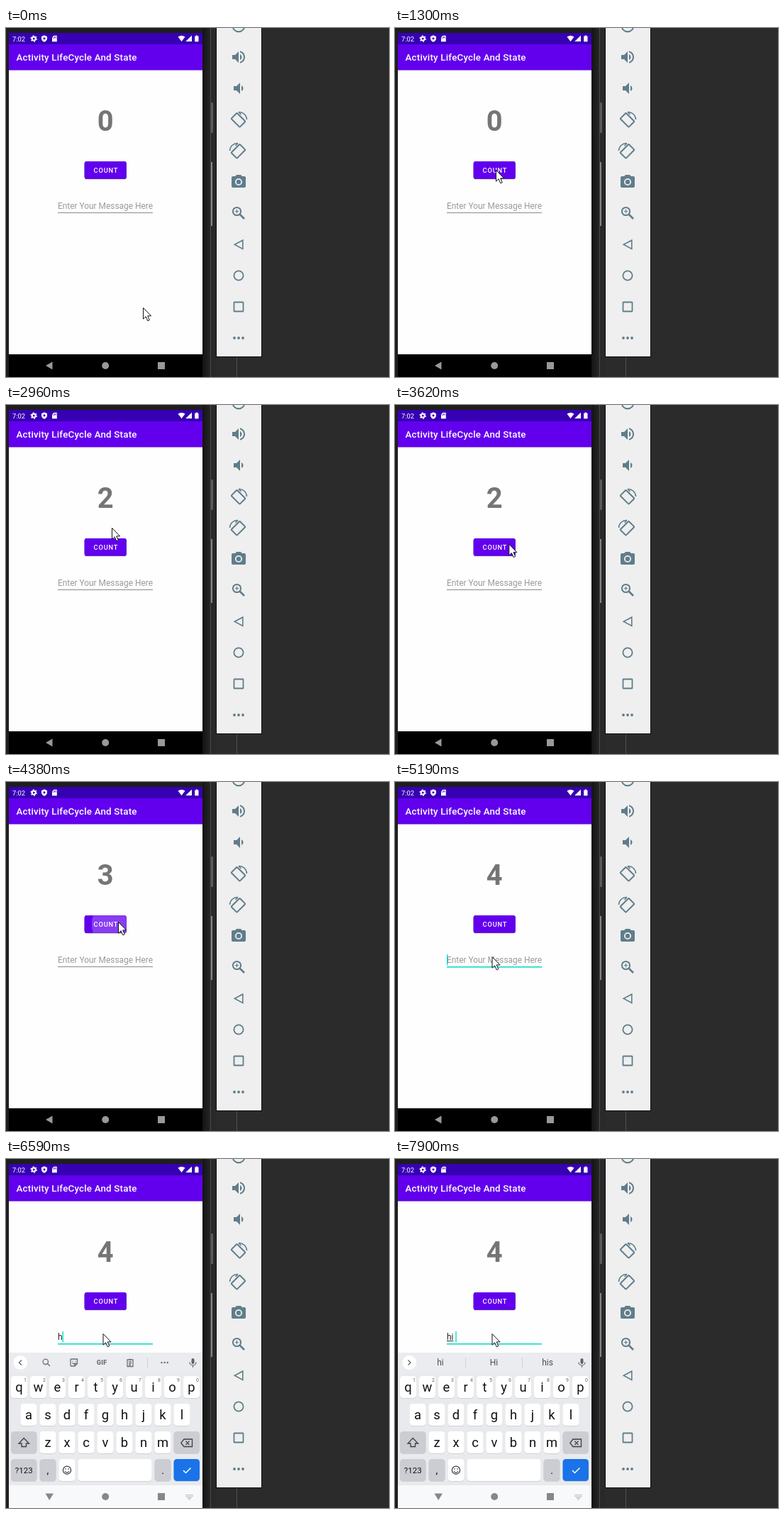
These frames come from a looping animation (540 by 492 pixels, 8000 ms). An HTML page:

```html
<!DOCTYPE html>
<html lang="en">
<head>
<meta charset="utf-8">
<title>Activity state demo</title>
<style>
  html, body { margin: 0; width: 100%; height: 100%; overflow: hidden; background: #2b2b2b; }
  svg { display: block; width: 100vw; height: 100vh; }
  text { font-family: Roboto, "Noto Sans", sans-serif; white-space: pre; }
  .mid { text-anchor: middle; }
  .medium { font-weight: 500; }
</style>
</head>
<body>
<svg viewBox="0 0 540 492">
  <defs>
    <clipPath id="screen"><rect x="4" y="7" width="273" height="485"/></clipPath>
    <clipPath id="buttonShape"><use href="#buttonRect"/></clipPath>
    <linearGradient id="bezel"><stop offset="0" stop-color="#141414"/><stop offset="1" stop-color="#242424"/></linearGradient>
  </defs>

  <!-- desktop and phone frame -->
  <rect width="540" height="492" fill="#2b2b2b"/>
  <rect width="288" height="492" fill="#1e1e1e"/>
  <rect x="277" width="10" height="492" fill="url(#bezel)"/>
  <rect x="287" width="9" height="492" fill="#292929"/>
  <path d="M288.5 0V492" stroke="#484848"/>
  <rect x="289" y="105" width="3" height="43" rx="1" fill="#5a5a5a"/>
  <rect x="289" y="189" width="2" height="90" fill="#858585"/>
  <path d="M325.5 463V492" stroke="#505050"/>

  <!-- emulator tools -->
  <rect x="296.5" y="-2" width="64" height="465.5" fill="#efefef" stroke="#0c0c0c"/>
  <g fill="none" stroke="#607d8b" stroke-width="2">
    <circle cx="328" cy="-3" r="8.3"/>
    <g id="rotateTool" transform="translate(328 129)">
      <rect x="-8.5" y="-5.7" width="17" height="11.4" rx="1" transform="translate(-.5 .8) rotate(45)"/>
      <path d="M0 -10.5C6 -11 11.300 -6 11.500 0M0 -10.500L3.500 -7" stroke-width="1.500"/>
    </g>
    <use href="#rotateTool" transform="translate(655 44) scale(-1 1)"/>
    <circle cx="325.5" cy="258.5" r="5.6"/>
    <path d="M329.5 262.5L336 269" stroke-width="2.6"/>
    <path d="M322.7 258.5h5.6M325.5 255.7v5.6" stroke-width="1.2"/>
    <path d="M333.8 299.200V311.500L322.300 305.300Z" stroke-width="1.600"/>
    <circle cx="328" cy="349" r="6.6" stroke-width="1.8"/>
    <rect x="321.500" y="386.500" width="13" height="13" rx=".600" stroke-width="1.800"/>
  </g>
  <g fill="#607d8b">
    <g transform="translate(316 29)">
      <path d="M3 9v6h4l5 5V4L7 9H3z"/>
      <path d="M16.5 12c0-1.77-1.02-3.29-2.5-4.03v8.05c1.48-.73 2.5-2.25 2.5-4.02zM14 3.23v2.06c2.89.86 5 3.54 5 6.71s-2.11 5.85-5 6.71v2.06c4.01-.91 7-4.49 7-8.77s-2.99-7.86-7-8.77z"/>
    </g>
    <path transform="translate(316 73)" d="M18.5 12c0-1.77-1.02-3.29-2.5-4.03v8.05c1.48-.73 2.5-2.25 2.5-4.02zM5 9v6h4l5 5V4L9 9H5z"/>
    <path transform="translate(316 205)" fill-rule="evenodd" d="M9 2L7.17 4H4c-1.1 0-2 .9-2 2v12c0 1.1.9 2 2 2h16c1.1 0 2-.9 2-2V6c0-1.1-.9-2-2-2h-3.17L15 2H9zm3 15a5 5 0 1 1 0-10 5 5 0 0 1 0 10zM12 8.8a3.2 3.2 0 1 0 0 6.4 3.2 3.2 0 0 0 0-6.4z"/>
    <circle cx="322" cy="437" r="1.9"/><circle cx="328" cy="437" r="1.9"/><circle cx="334" cy="437" r="1.9"/>
  </g>

  <g clip-path="url(#screen)">
    <!-- app -->
    <rect x="4" y="7" width="273" height="453" fill="#fefefe"/>
    <rect x="4" y="7" width="273" height="16" fill="#3700b3"/>
    <rect x="4" y="23" width="273" height="36.500" fill="#6200ee"/>
    <text x="9" y="18.800" font-size="9.300" fill="#fff">7:02</text>
    <g fill="#fff">
      <circle cx="39.2" cy="15" r="2.5" fill="none" stroke="#fff" stroke-width="2"/>
      <circle cx="39.2" cy="15" r="4" fill="none" stroke="#fff" stroke-width="1.4" stroke-dasharray="2 2.19"/>
      <path d="M54 10.3l4 1.6v2.9c0 2.3-1.6 4.2-4 5-2.4-.8-4-2.7-4-5v-2.9z"/>
      <circle cx="54" cy="14.8" r="1.5" fill="#3700b3"/>
      <path d="M67.5 10.7h4.3v8.6h-6.8v-6.1z"/>
      <path d="M66.8 13v2M68.5 12v2.5M70.2 12v2.5" stroke="#3700b3" stroke-width=".8"/>
      <path d="M242.500 12.600Q247.500 8.800 252.500 12.600L247.500 19z"/>
      <path d="M262 10.500V19h-8.700z"/>
      <path d="M266.200 11.500h1.500v-1h2.300v1h1.500V19.300h-5.300z"/>
    </g>
    <text class="medium" x="14.500" y="46.300" font-size="13.350" letter-spacing=".2" fill="#fff">Activity LifeCycle And State</text>
    <text class="mid" id="count" x="140.300" y="145.200" font-size="39.900" font-weight="700" fill="#757575"></text>
    <use id="buttonShadow" href="#buttonRect" y="1"/>
    <rect id="buttonRect" x="110.800" y="188.200" width="58.800" height="24.400" rx="2.700"/>
    <use href="#buttonRect" style="filter:none" fill="#6200ee"/>
    <rect x="110.800" y="188.200" width="58.800" height="24.400" rx="2.700" fill="#6200ee"/>
    <g clip-path="url(#buttonShape)"><circle id="ripple" cy="200.500" fill="#fff"/></g>
    <text class="mid medium" x="140.900" y="204.100" font-size="9.300" letter-spacing=".83" fill="#fff">COUNT</text>
    <text id="field" x="73" y="255.200" font-size="11.900"></text>
    <path id="composing" stroke="#333"/>
    <path id="fieldLine"/>
    <rect id="caret" y="243" width="1.300" height="15.500" fill="#03dac5"/>

    <!-- system navigation -->
    <rect x="4" y="460" width="273" height="32"/>
    <g fill="#999">
      <path d="M65.500 470.500V481.500L56 476Z"/>
      <g id="homeAndRecents">
        <circle cx="140.200" cy="476" r="5"/>
        <rect x="214" y="471" width="10" height="10"/>
      </g>
    </g>

    <g id="keyboard">
      <rect x="4" y="273" width="273" height="220" fill="#e8eaed"/>
      <rect x="4" y="273" width="273" height="28.500" fill="#ebecef"/>
      <circle cx="20.300" cy="287" r="10" fill="#fff"/>
      <path id="chevron" fill="none" stroke="#5f6368" stroke-width="1.300"/>
      <g id="tools" fill="none" stroke="#6b6f74" stroke-width="1.300">
        <circle cx="55.800" cy="285.800" r="3.700"/><path d="M58.500 288.500L62 292"/>
        <path d="M92 282h8.500v6.500l-3.500 3.500h-5q-1 0-1-1v-8q0-1 1-1M100.500 288.500h-3.500v3.500M93.500 287.500q2.300 2.500 4.500 0M94 284.800v1M98 284.800v1"/>
        <text class="mid" x="135.200" y="290.300" font-size="9" font-weight="900" letter-spacing=".3" fill="#6b6f74" stroke="none">GIF</text>
        <path d="M171 283h8v9.500h-8zM173.500 282.500h3M173 286h4M173 288.300h4M173 290.500h3"/>
        <path d="M199.500 280V294" stroke="#d0d2d6" stroke-width="1"/>
        <path d="M219.500 287h.01M223.600 287h.01M227.700 287h.01" stroke-width="2.400" stroke-linecap="round"/>
      </g>
      <g id="suggestions" font-size="12" fill="#4a4d51">
        <path d="M99.500 280V294M179.500 280V294" stroke="#cfd1d5"/>
        <text class="mid" x="64" y="291.300"></text>
        <text class="mid" x="139.500" y="291.300"></text>
        <text class="mid" x="215" y="291.300"></text>
      </g>
      <rect x="261.500" y="281" width="4" height="8" rx="2" fill="#5f6368"/>
      <path d="M259 286.500a4.500 4.500 0 0 0 9 0M263.500 291v2.700" fill="none" stroke="#5f6368" stroke-width="1.200"/>
      <g id="keys"></g>
      <g fill="none" stroke="#3c4043" stroke-width="1.300">
        <path d="M25.200 393.500L32.500 401H28.500V405.500H22V401H18Z"/>
        <path d="M251 395h11.500v10.500h-11.500L246.800 400.200ZM253.500 397.800l5 5M258.500 397.800l-5 5"/>
        <circle cx="86" cy="438.700" r="5.600"/>
        <path d="M83 440.300q3 3.500 6 0M84 436.300v1.500M88 436.300v1.500"/>
        <path d="M250 439l3.500 3.500 7-7" stroke="#fff" stroke-width="1.500"/>
      </g>
      <rect x="4" y="460" width="273" height="33" fill="#f8f9fa"/>
      <g fill="#85878a">
        <path d="M55.500 471.500H67L61.200 481Z"/>
        <use href="#homeAndRecents"/>
      </g>
      <g fill="none" stroke="#9a9c9f">
        <path d="M253.500 473.500h10M253.500 475.500h10" stroke-dasharray="1.300 .9" stroke-width="1.200"/>
        <path d="M255.500 477.700h6M257.500 480h2"/>
      </g>
    </g>
  </g>

  <path id="pointer" d="M.5 .5V16.200L4.100 12.800L6.800 18.800L9.300 17.700L6.700 11.900H11.600Z" fill="#fff" stroke="#111" stroke-linejoin="round"/>
</svg>
<script>
const LOOP = 8000;
const PRESSES = [1850, 2480, 3870, 4370];
const FOCUS = 5190;
const TYPING = [[6590, 'h'], [7780, 'hi'], [7900, 'hi ']];
const GREY = '#cbcdd3';

const $ = id => document.getElementById(id);
const set = (el, attrs) => { for (const k in attrs) el.setAttribute(k, attrs[k]); };
const progress = (t, from, to) => Math.min(1, Math.max(0, (t - from) / (to - from)));
const easeOut = u => 1 - (1 - u) ** 2;

function add(parent, tag, attrs, text = '') {
  const el = document.createElementNS('http://www.w3.org/2000/svg', tag);
  set(el, attrs);
  el.textContent = text;
  parent.append(el);
}

// Keys sit on a grid of 27 px columns and 39 px rows.
const COLUMN = 27;
const rowTop = row => 306 + row * 39;
function key(column, row, span, label = '', fill = '#fff', size = 18.4) {
  const x = 7 + column * COLUMN, y = rowTop(row), width = span * COLUMN - 4;
  const box = { x, width, height: 31, rx: 4.5 };
  add($('keys'), 'rect', { ...box, y: y + 1, fill: '#cfd1d6' });
  add($('keys'), 'rect', { ...box, y, fill });
  add($('keys'), 'text', { x: x + width / 2, y: y + 16 + size * .35, class: 'mid', 'font-size': size, fill: '#111' }, label);
}
['qwertyuiop', 'asdfghjkl', 'zxcvbnm'].forEach((letters, row) =>
  [...letters].forEach((c, i) => key(i + (10 - letters.length) / 2, row, 1, c)));
for (let i = 0; i < 10; i++)
  add($('keys'), 'text', { x: 27 + i * COLUMN, y: 314, class: 'mid', 'font-size': 7, fill: '#5f6368' }, (i + 1) % 10);
key(0, 2, 1.5, '', GREY);
key(8.5, 2, 1.5, '', GREY);
key(0, 3, 1.5, '?123', GREY, 11.5);
key(1.5, 3, 1, ',', GREY, 14);
key(2.5, 3, 1);
key(3.5, 3, 4);
key(7.5, 3, 1, '.', GREY, 14);
key(8.5, 3, 1.5, '', '#1a73e8');

// Each glide: start, end, and the point reached.
const GLIDES = [
  [60, 240, 185.5, 302], [240, 760, 125, 165], [760, 1150, 140, 201], [1150, 1300, 142, 200],
  [2680, 2960, 149, 173], [3040, 3470, 164, 194], [3470, 3870, 158, 197],
  [4420, 4670, 160, 279], [4670, 5040, 136.5, 246]
];
function pointerAt(t) {
  return GLIDES.reduce(([x, y], [from, to, nx, ny]) => {
    const e = easeOut(progress(t, from, to));
    return [x + (nx - x) * e, y + (ny - y) * e];
  }, [193, 394]);
}

function drawButton(t) {
  $('count').textContent = PRESSES.filter(p => t >= p + 120).length;
  const press = PRESSES.findLast(p => p <= t) ?? -LOOP;
  const age = t - press;
  const glow = 1 - progress(age, 120, 300);
  set($('ripple'), { cx: pointerAt(press)[0], r: 35 + Math.min(age, 300) * .2, opacity: .24 * glow });
  set($('buttonShadow'), { opacity: .18 + .15 * glow });
}

function drawField(t) {
  const focused = t >= FOCUS;
  const [typedAt, typed] = TYPING.findLast(([time]) => time <= t) || [FOCUS, ''];
  const field = $('field');
  field.textContent = typed || 'Enter Your Message Here';
  set(field, { fill: typed ? '#222' : '#999' });
  set($('fieldLine'), {
    d: `M73 ${focused ? 260.7 : 260.5}H207`,
    stroke: focused ? '#03dac5' : '#8a8a8a',
    'stroke-width': focused ? 1.4 : 1
  });
  const lit = focused && Math.floor((t - typedAt) / 560) % 2 === 0;
  set($('caret'), { x: 73 + (typed && field.getComputedTextLength()), opacity: +lit });
  const word = typed.trimEnd();
  const underlined = word && t >= TYPING[0][0] + 150;
  set($('composing'), { d: `M73 256.5h${underlined ? field.getSubStringLength(0, word.length) : 0}` });
}

function drawKeyboard(t) {
  const rise = progress(t, 5440, 5964);
  set($('keyboard'), {
    transform: `translate(0 ${219 * (1 - easeOut(rise))})`,
    opacity: Math.min(1, rise * 1.4)
  });
  const words = t >= 7900 ? ['hi', 'Hi', 'his'] : t >= 6990 ? ['h', 'H', 'hi'] : [];
  const suggesting = words.length > 0;
  set($('tools'), { opacity: +!suggesting });
  set($('suggestions'), { opacity: +suggesting });
  document.querySelectorAll('#suggestions text').forEach((el, i) => { el.textContent = words[i] || ''; });
  set($('chevron'), { d: suggesting ? 'M18.5 283.5L22 287L18.5 290.5' : 'M22 283.5L18.5 287L22 290.5' });
}

function draw(t) {
  set($('pointer'), { transform: `translate(${pointerAt(t)})` });
  drawButton(t);
  drawField(t);
  drawKeyboard(t);
}

const start = performance.now();
function frame() {
  draw((performance.now() - start) % LOOP);
  requestAnimationFrame(frame);
}
frame();
</script>
</body>
</html>
```
